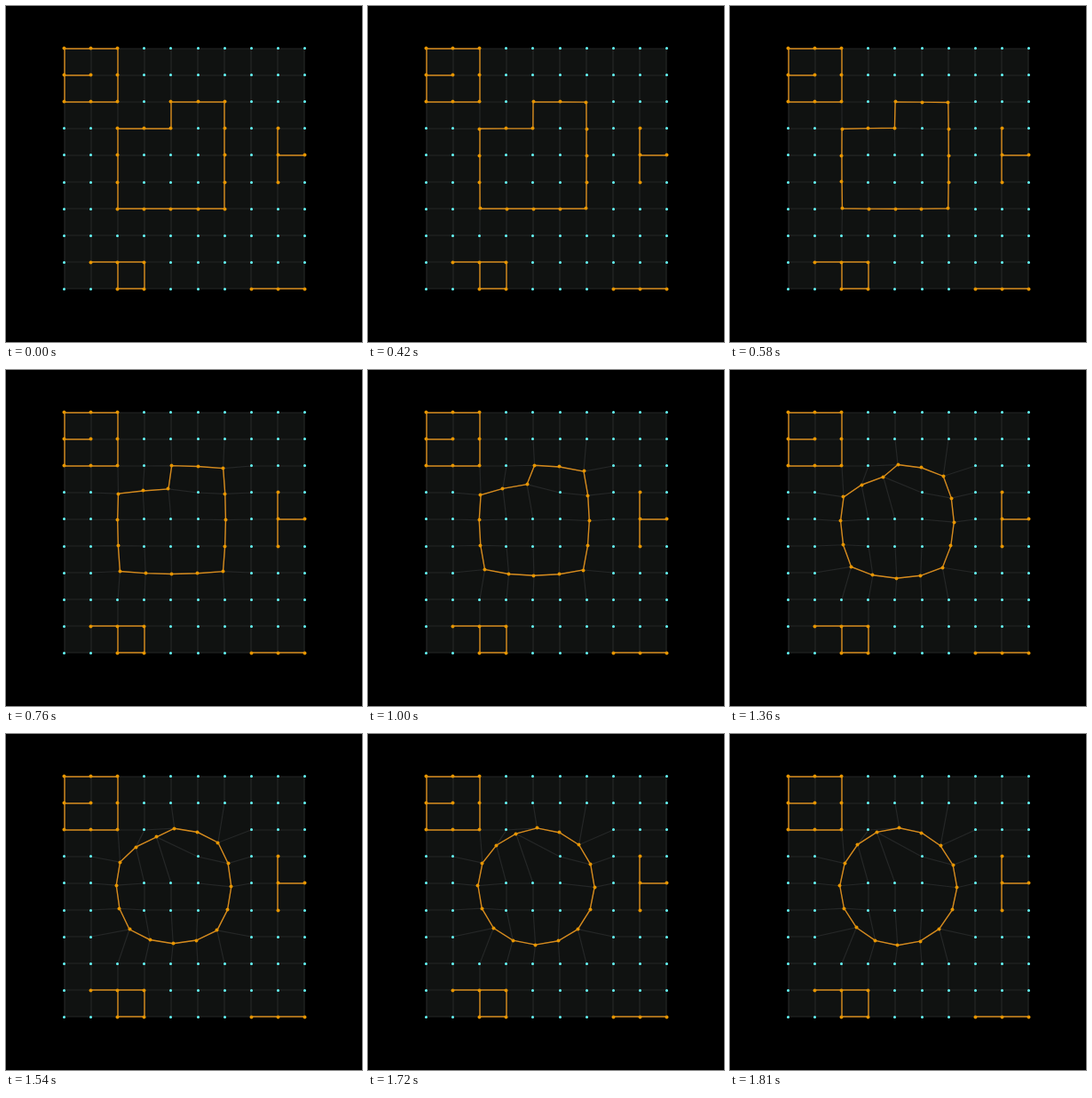
Animation, 401 px wide and 378 px high, one loop 6.49 s. Source, as an HTML page with a canvas:

```html
<!DOCTYPE html>
<html lang="en">
<head>
<meta charset="utf-8">
<title>Grid loop relaxing into a circle</title>
<style>
html, body { margin: 0; width: 100%; height: 100%; overflow: hidden; background: #000; }
canvas { display: block; width: 401px; height: 378px; }
</style>
</head>
<body>
<canvas id="stage" width="401" height="378"></canvas>
<script>
const ctx = document.getElementById('stage').getContext('2d');
const LOOP = 6490, STEPS = 17;
const SIZE = 10, GAP = 30, SPAN = GAP * (SIZE - 1), LEFT = 66, TOP = 48;

// Paths through the grid as corner points [column, row]
const ringPath = [[4, 2], [6, 2], [6, 6], [2, 6], [2, 3], [4, 3], [4, 2]];
const fixedPaths = [
  [[0, 0], [2, 0], [2, 2], [0, 2], [0, 0]],
  [[0, 1], [1, 1]],
  [[1, 8], [3, 8], [3, 9], [2, 9], [2, 8]],
  [[8, 3], [8, 5]],
  [[8, 4], [9, 4]],
  [[7, 9], [9, 9]]
];

const key = (c, r) => r * SIZE + c;
const home = k => [LEFT + GAP * (k % SIZE), TOP + GAP * Math.floor(k / SIZE)];

// All grid points passed by a path of corners
function trace(path) {
  const keys = [key(...path[0])];
  for (let i = 1; i < path.length; i++) {
    let [c, r] = path[i - 1];
    const [c2, r2] = path[i];
    while (c !== c2 || r !== r2) {
      c += Math.sign(c2 - c);
      r += Math.sign(r2 - r);
      keys.push(key(c, r));
    }
  }
  return keys;
}

const ring = trace(ringPath);
const chains = [ring, ...fixedPaths.map(trace)];
const marked = new Set(chains.flat());
const mesh = [];
for (let i = 0; i < SIZE; i++)
  mesh.push(trace([[0, i], [SIZE - 1, i]]), trace([[i, 0], [i, SIZE - 1]]));

// Spread the ring's points evenly on a circle around their centroid
const corners = ring.slice(1).map(home), count = corners.length;
const mean = axis => corners.reduce((sum, p) => sum + p[axis], 0) / count;
const cx = mean(0), cy = mean(1), radius = 2.2 * GAP;
const goals = new Map();
for (let i = 0; i < count; i++) {
  const a = (i / count - .25) * 2 * Math.PI + .015;
  goals.set(ring[i], [cx + radius * Math.cos(a), cy + radius * Math.sin(a)]);
}

function pose(p) {
  return Array.from({ length: SIZE * SIZE }, (_, k) => {
    const [x, y] = home(k), goal = goals.get(k);
    return goal ? [x + (goal[0] - x) * p, y + (goal[1] - y) * p] : [x, y];
  });
}

function strokeChains(points, list, color, width) {
  ctx.beginPath();
  for (const chain of list)
    chain.forEach((k, i) => i ? ctx.lineTo(...points[k]) : ctx.moveTo(...points[k]));
  ctx.strokeStyle = color;
  ctx.lineWidth = width;
  ctx.stroke();
}

// Dots sit on whole pixels, rounded away from the middle of the grid
const snap = (v, mid) => Math.floor(mid + (v - mid) * 1.001) + .5;

function draw(p) {
  const points = pose(p);
  ctx.fillStyle = '#000';
  ctx.fillRect(0, 0, 401, 378);
  ctx.fillStyle = '#101211';
  ctx.fillRect(LEFT, TOP, SPAN, SPAN);
  strokeChains(points, mesh, '#252727', 1.2);
  strokeChains(points, chains, '#d68a1c', 1.4);
  points.forEach(([x, y], k) => {
    const on = marked.has(k);
    ctx.fillStyle = on ? '#e59400' : '#6ff';
    ctx.beginPath();
    ctx.arc(snap(x, LEFT + SPAN / 2), snap(y, TOP + SPAN / 2), on ? 2 : 1.5, 0, 2 * Math.PI);
    ctx.fill();
  });
}

// The pose advances in steps, a little faster during the first second
function stepAt(t) {
  if (t < 420) return 0;
  if (t < 1000) return 1 + Math.floor((t - 420) / 83);
  return Math.min(STEPS, 8 + Math.floor((t - 1000) / 90));
}

const ease = u => u * u * (2 - u);

const start = performance.now();
function tick() {
  const t = (performance.now() - start) % LOOP;
  draw(ease(stepAt(t) / STEPS));
  requestAnimationFrame(tick);
}
tick();
</script>
</body>
</html>
```
